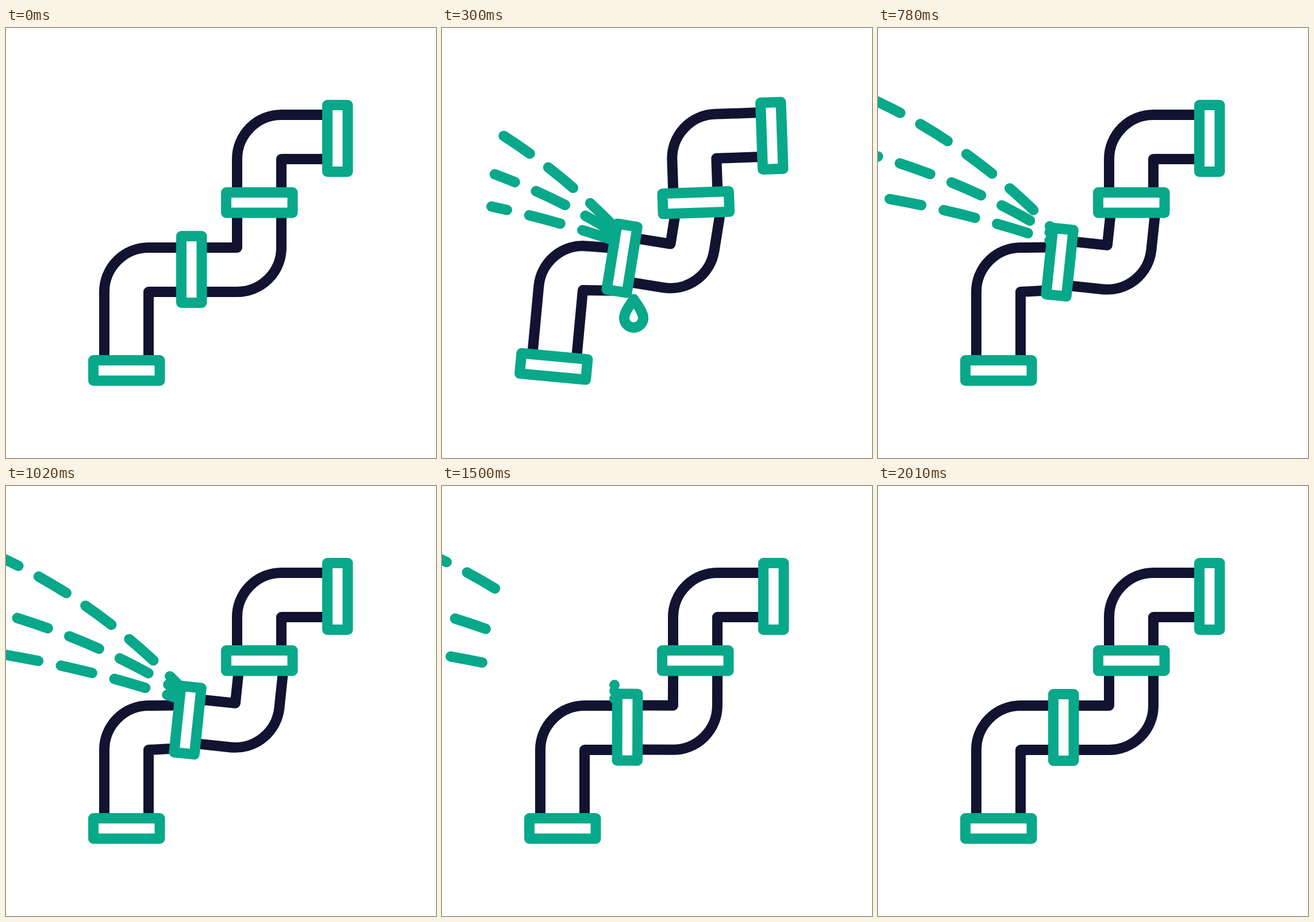
Animation, 748 px wide and 748 px high, one loop 2.07 s. Source, as an HTML page:

```html
<!DOCTYPE html>
<html lang="en">
<head>
<meta charset="utf-8">
<title>Leaking pipe</title>
<style>
  html, body { margin: 0; width: 100%; height: 100%; overflow: hidden; background: #fff; }
  svg { display: block; width: 100%; height: 100%; }
  path, rect { stroke-width: 18; stroke-linejoin: round; }
  .pipe { fill: none; stroke: #121331; }
  .flange { fill: #fff; stroke: #08a88a; }
  .water { fill: none; stroke: #08a88a; stroke-linecap: round; }
  #drop { vector-effect: non-scaling-stroke; }
</style>
</head>
<body>
<svg viewBox="0 0 748 748">
  <g class="left">
    <path class="pipe" id="bend"/>
    <rect class="flange" x="152" y="578" width="115.500" height="35.500"/>
  </g>
  <g class="mid">
    <path class="pipe" d="M402 308V382H325M479 308V382A77 77 0 0 1 402 459H325"/>
  </g>
  <path class="water jet" d="M300 346Q150 192 -30 115"/>
  <path class="water jet" d="M300 356.500Q158 267 -30 215"/>
  <path class="water jet" d="M300 370Q146 316.500 -30 289"/>
  <path class="water" id="drop" d="M0 0C-5 9 -21.500 28 -21.500 42.500A21.500 21.500 0 0 0 21.500 42.500C21.500 28 5 9 0 0Z"/>
  <g class="mid">
    <rect class="flange" x="305" y="362" width="35.500" height="116"/>
  </g>
  <g class="top">
    <path class="pipe" d="M402 290V228A77 77 0 0 1 479 151H558M479 290V228H558"/>
    <rect class="flange" x="383" y="286" width="115.500" height="35.500"/>
    <rect class="flange" x="559" y="134" width="35.500" height="116"/>
  </g>
</svg>
<script>
const LOOP = 2070, STEP = 30, DASH = 56, PERIOD = 95.9;
const all = s => [...document.querySelectorAll(s)];
const bend = document.getElementById('bend');
const drop = document.getElementById('drop');
const jets = all('.jet');
const reach = [1, 0.93, 0.89];

// Pivot and eased [time, angle] keys of each pipe section
const sections = {
  top: { pivot: '444 276', keys: [[0, 0], [110, 6], [240, -6], [360, 2], [450, 0]] },
  left: { pivot: '278 425', keys: [[0, 0], [110, -4], [260, 6], [450, 0]] },
  mid: { pivot: '440 350', keys: [[0, 0], [110, -4], [260, 9.5], [450, 6], [1140, 6], [1545, 0]] }
};

function valueAt(keys, t) {
  const i = keys.findIndex(k => k[0] > t);
  if (i < 0) return keys[keys.length - 1][1];
  const [t0, a] = keys[i - 1], [t1, b] = keys[i];
  const u = (t - t0) / (t1 - t0);
  return a + (b - a) * u * u * (3 - 2 * u);
}

// Dashes flow from the trimmed start of the jet to its front
function dashes(start, front, t) {
  const phase = (59 + (t - 300) * 0.48) % PERIOD + PERIOD;
  const list = [0];
  let end = 0;
  for (let tip = start + phase % PERIOD; tip - DASH < front; tip += PERIOD) {
    const a = Math.max(start, tip - DASH), b = Math.min(front, tip);
    if (b <= a) continue;
    list.push(a - end, b - a);
    end = b;
  }
  return [...list, 9999].join(' ');
}

function drawJets(t) {
  const front = (t - 130) * 1.47, start = Math.max(0, (t - 1241) * 1.02);
  jets.forEach((jet, i) => {
    const on = front > 0 && start < 420;
    jet.style.display = on ? '' : 'none';
    if (!on) return;
    const length = jet.getTotalLength();
    jet.setAttribute('stroke-dasharray',
      dashes(start * reach[i], Math.min(length, front * reach[i]), t));
  });
}

function drawDrop(t) {
  const age = t < 1000 ? t : t - 1390;
  const size = Math.min(1, (age - 210) / 117);
  const fall = Math.max(0, age - 290);
  const y = 471.5 + 0.00267 * fall * fall;
  drop.style.display = size > 0 && y < 770 ? '' : 'none';
  drop.setAttribute('transform', `translate(333.5 ${y}) scale(${Math.max(size, 0.01)})`);
}

function draw(t) {
  for (const [name, { pivot, keys }] of Object.entries(sections)) {
    const turn = `rotate(${valueAt(keys, t)} ${pivot})`;
    all('.' + name).forEach(g => g.setAttribute('transform', turn));
  }
  const tilt = valueAt(sections.mid.keys, t);
  bend.setAttribute('d', `M300 ${382 - tilt * 0.1}L248 382A77 77 0 0 0 171 459V582` +
    `M300 ${459 - tilt * 0.45}L248 459V582`);
  drawJets(t);
  drawDrop(t);
}

const begin = performance.now();
function tick() {
  const t = (performance.now() - begin) % LOOP;
  draw(Math.min(2010, Math.floor(t / STEP) * STEP));
  requestAnimationFrame(tick);
}
tick();
</script>
</body>
</html>
```
